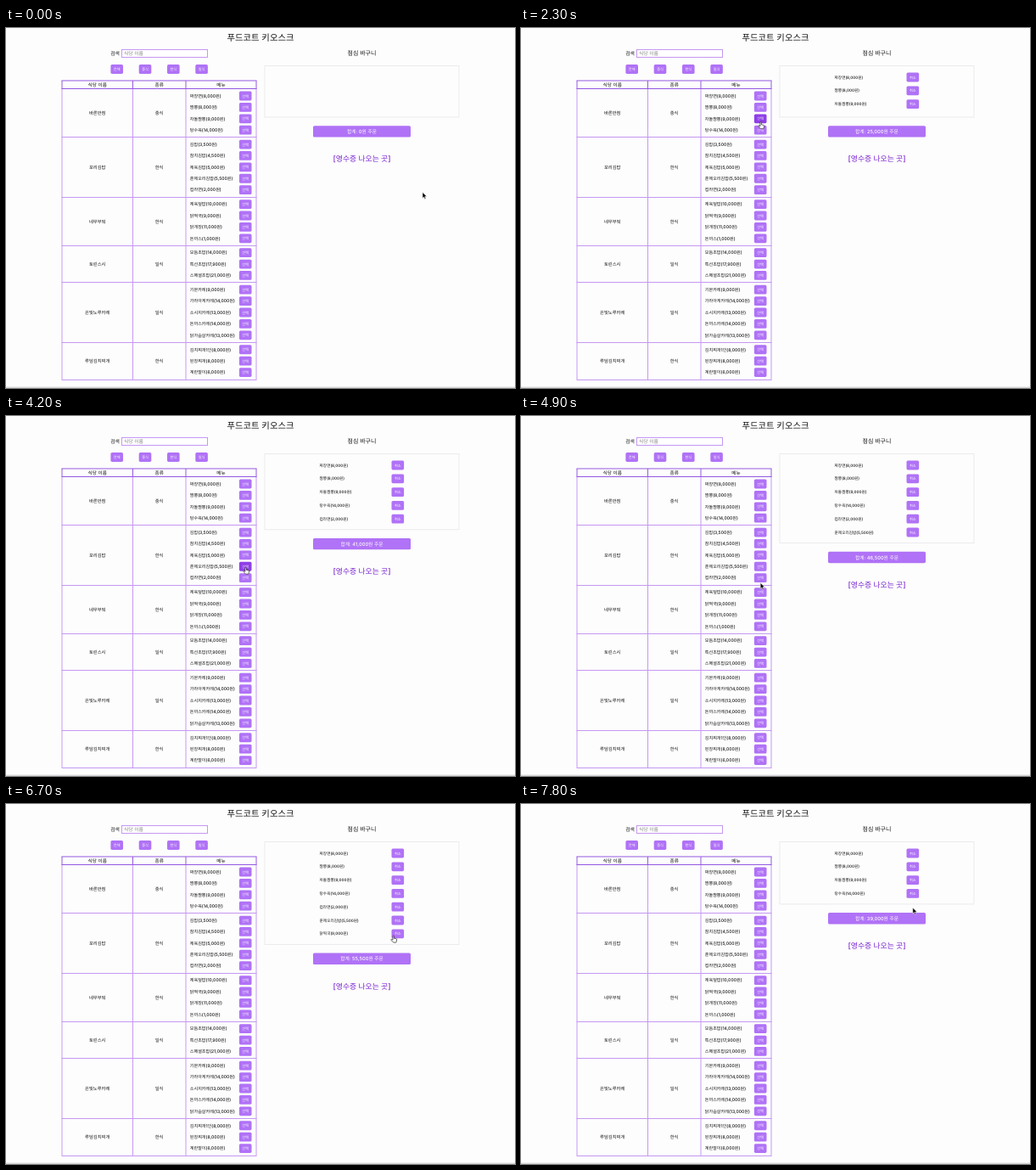
An HTML page for the animation above (8 s loop, 600 by 424 pixels).

```html
<!DOCTYPE html>
<html lang="ko">
<head>
<meta charset="utf-8">
<style>
html, body { margin: 0; width: 100%; height: 100%; overflow: hidden; background: #fdfdfd; }
svg { display: block; width: 600px; height: 424px; }
text { font-family: Inter, "Noto Sans CJK KR", "Noto Sans CJK", "Noto Sans KR", sans-serif; font-weight: 500; text-rendering: geometricPrecision; white-space: pre; }
</style>
</head>
<body>
<svg id="stage" viewBox="0 0 600 424" xmlns="http://www.w3.org/2000/svg">
  <g id="page"></g>
  <g id="cart"></g>
  <path id="arrow" d="M0 0V6.9L1.6 5.4L2.7 8L3.9 7.5L2.8 5H5Z" fill="#000" stroke="#fff" stroke-width=".5"/>
  <g id="hand">
    <path d="M-.3 .6a.7.7 0 0 1 1.4 0V3L3.5 3.5Q4.5 3.7 4.4 4.8L4.1 6.2Q3.9 7.1 3.5 7.9H.4L-2.1 5.4Q-2.7 4.5-1.9 4.1Q-1.3 4-.3 5Z" fill="#fff" stroke="#222" stroke-width=".7" stroke-linejoin="round"/>
  </g>
</svg>
<script>
const NS = 'http://www.w3.org/2000/svg';
const $ = id => document.getElementById(id);
const LOOP = 8000, STEP = 100, DWELL = 200;
const LILAC = '#b072f6', DEEP = '#8f3fe6', EDGE = '#c598f4', HEAD = '#9458e2';
const CANCEL_X = 461.8;

const shops = [
  ['바론반점', '중식', '짜장면 8,000/짬뽕 8,000/차돌짬뽕 9,000/탕수육 14,000'],
  ['포리김밥', '한식', '김밥 3,500/참치김밥 4,500/제육김밥 5,000/훈제오리김밥 5,500/컵라면 2,000'],
  ['네무부엌', '한식', '제육덮밥 10,000/닭떡국 9,000/닭개장 11,000/돈까스 1,000'],
  ['토린스시', '일식', '모듬초밥 14,000/특선초밥 17,900/스페셜초밥 21,000'],
  ['은빛노루카레', '일식', '기본카레 9,000/가라아게카레 14,000/소시지카레 13,000/돈까스카레 14,000/닭가슴살카레 13,000'],
  ['루담김치찌개', '한식', '김치찌개1인 8,000/된장찌개 8,000/계란말이 6,000']
];

// what the pointer does, when it gets there, and where on the button it rests
const visits = [
  { act: 'pass', name: '중식', at: 900, dy: 2 },
  { act: 'add', name: '짜장면', at: 1000, dx: 6, dy: 2 },
  { act: 'add', name: '짬뽕', at: 1600, dy: 3 },
  { act: 'add', name: '차돌짬뽕', at: 2100, dy: 4 },
  { act: 'add', name: '탕수육', at: 3300, dy: 2 },
  { act: 'add', name: '컵라면', at: 3800, dy: 2 },
  { act: 'add', name: '훈제오리김밥', at: 4200, dy: 1 },
  { act: 'add', name: '닭떡국', at: 5100, dy: -2 },
  { act: 'drop', name: '닭떡국', at: 6800, dx: 1 },
  { act: 'drop', name: '훈제오리김밥', at: 7200, dx: 1 },
  { act: 'drop', name: '컵라면', at: 7600, dy: 1 }
];

const left = { 'text-anchor': 'start' }, bold = { 'font-weight': 700 };
const spots = {}, price = {}, fixed = [], moves = [];

function add(parent, tag, attrs, content) {
  const el = document.createElementNS(NS, tag);
  for (const k in attrs) el.setAttribute(k, attrs[k]);
  if (content !== undefined) el.textContent = content;
  parent.appendChild(el);
  return el;
}
const label = (g, str, x, y, size, opt = {}) => add(g, 'text', {
  x, y: y + size * 0.36, 'font-size': size, fill: '#111', 'text-anchor': 'middle', ...opt
}, str);
const line = (g, x1, y1, x2, y2, stroke) => add(g, 'line', { x1, y1, x2, y2, stroke });
const snap = y => Math.floor(y) + 0.5;
const won = n => String(n).replace(/\B(?=(\d{3})+$)/g, ',') + '원';
const dishLine = name => `${name}(${won(price[name])})`;
const rowY = i => 58 + i * 15.8;

function button(g, str, x, y) {
  const rect = add(g, 'rect', { x: x - 7.3, y: y - 5.4, width: 14.6, height: 10.8, rx: 1.6, fill: LILAC });
  label(g, str, x, y, 4.2, { fill: '#fff' });
  return { rect, x, y };
}

function buildPage() {
  const g = $('page');
  label(g, '푸드코트 키오스크', 300, 11.5, 10.35, bold);
  label(g, '점심 바구니', 419.5, 29.7, 6.95, bold);
  label(g, '검색', 123.2, 30, 5.8, left);
  add(g, 'rect', { x: 136.5, y: 25.5, width: 101, height: 9, fill: '#fff', stroke: EDGE });
  label(g, '식당 이름', 139, 30, 5.8, { ...left, fill: '#858585' });
  ['전체', '중식', '한식', '일식'].forEach((s, i) => {
    fixed.push(spots[s] = button(g, s, 130.7 + i * 33.3, 48.5));
  });

  let top = 71.7;
  for (const [shop, kind, menu] of shops) {
    const dishes = menu.split('/');
    const end = top + 13.5 * dishes.length + 3.05;
    label(g, shop, 107.7, (top + end) / 2, 5.3);
    label(g, kind, 180.5, (top + end) / 2, 5.3);
    dishes.forEach((dish, i) => {
      const [name, cost] = dish.split(' ');
      const y = top + 8.3 + i * 13.4;
      price[name] = Number(cost.replace(',', ''));
      label(g, dishLine(name), 216.8, y, 5.1, left);
      fixed.push(spots[name] = button(g, '선택', 282.2, y));
    });
    line(g, 65.5, snap(end), 295.5, snap(end), EDGE);
    top = end;
  }
  for (const x of [66, 149.5, 212, 295]) {
    line(g, x, 71.5, x, top, EDGE);
    line(g, x, 62, x, 71.5, HEAD);
  }
  for (const y of [62, 71.5]) line(g, 65.5, y, 295.5, y, HEAD);
  label(g, '식당 이름', 107.7, 66.8, 5.65, bold);
  label(g, '종류', 180.7, 66.8, 5.65, bold);
  label(g, '메뉴', 253.5, 66.8, 5.65, bold);
  line(g, 0, 423.2, 600, 423.2, '#c6c6c8');
}

// turns visits into glides whose length grows with the distance
function planMoves() {
  let from = [491, 193.5], free = 0, items = [];
  for (const { act, name, at, dx = 0, dy = 0 } of visits) {
    const spot = act === 'drop' ? { x: CANCEL_X, y: rowY(items.indexOf(name)) } : spots[name];
    const to = [spot.x + dx, spot.y + dy];
    const dist = Math.hypot(to[0] - from[0], to[1] - from[1]);
    const leave = Math.max(free, at - 200 - 1.7 * dist);
    if (act === 'add') items = [...items, name];
    if (act === 'drop') items = items.filter(n => n !== name);
    free = act === 'pass' ? at : at + DWELL;
    moves.push({ from, to, leave, at, click: free, items });
    from = to;
  }
}

function tipAt(t) {
  const m = moves.filter(m => m.leave <= t).pop();
  if (!m) return moves[0].from;
  const k = Math.min(1, (t - m.leave) / (m.at - m.leave));
  const ease = 1 - (1 - k) ** 2;
  return m.from.map((v, i) => v + (m.to[i] - v) * ease);
}

function drawCart(items) {
  const g = $('cart');
  g.textContent = '';
  const end = Math.max(105, 54.6 + 15.83 * items.length);
  add(g, 'rect', { x: 305, y: 44.5, width: 229, height: end - 44.5, fill: 'none', stroke: '#ebebee' });
  const cancels = items.map((name, i) => {
    label(g, dishLine(name), 369.6, rowY(i), 4.65, left);
    return button(g, '취소', CANCEL_X, rowY(i));
  });
  add(g, 'rect', { x: 362, y: end + 10.2, width: 115, height: 13.4, rx: 1.6, fill: LILAC });
  const total = items.reduce((sum, name) => sum + price[name], 0);
  label(g, `합계: ${won(total)} 주문`, 419.5, end + 17, 5.75, { fill: '#fff' });
  label(g, '[영수증 나오는 곳]', 419.5, end + 49, 8.8, { ...bold, fill: '#7820d0' });
  return cancels;
}

const inside = (b, [x, y]) => Math.abs(x - b.x) < 7.3 && Math.abs(y - b.y) < 5.4;

function render(t) {
  const done = moves.filter(m => m.click <= t).pop();
  const buttons = fixed.concat(drawCart(done ? done.items : []));
  const tip = tipAt(t), before = tipAt(t - STEP);
  const under = buttons.find(b => inside(b, tip));
  // the hover colour comes one step after the pointer
  for (const b of buttons) b.rect.setAttribute('fill', b === under && inside(b, before) ? DEEP : LILAC);
  for (const id of ['arrow', 'hand']) {
    $(id).setAttribute('transform', `translate(${tip})`);
    $(id).setAttribute('display', (id === 'hand') === !!under ? 'inline' : 'none');
  }
}

buildPage();
planMoves();
let last = -1;
const start = performance.now();
function tick(now) {
  const t = Math.floor(Math.max(0, now - start) % LOOP / STEP) * STEP;
  if (t !== last) render(last = t);
  requestAnimationFrame(tick);
}
render(0);
requestAnimationFrame(tick);
</script>
</body>
</html>
```
